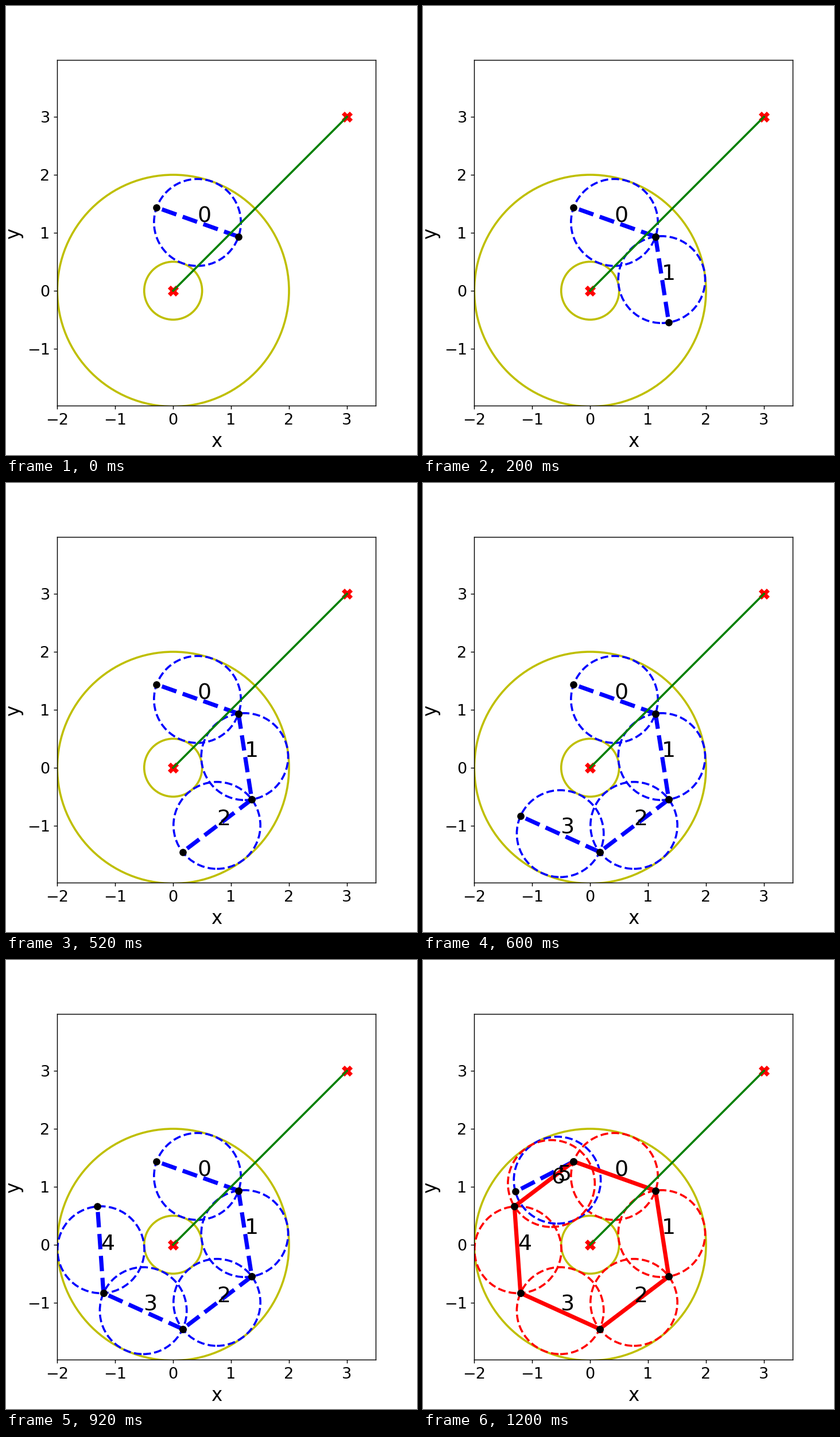
A matplotlib script for the animation above (1400 ms loop, 716 px wide and 782 px high).

```python
import numpy as np
import matplotlib.pyplot as plt
from matplotlib.animation import FuncAnimation
from matplotlib.patches import Circle

WIDTH, HEIGHT, DPI = 716, 782, 130
FRAMES, INTERVAL = 7, 200
RING, REACH, JOINT_RADIUS = 1.25, 0.75, 1.464
START, STEP = 101.2, 61.6
BRANCH_ANGLE, BRANCH_TIP = 117, (-1.287, 0.915)
LEFT, BOTTOM, RIGHT, TOP = 0.1248, 0.11, 0.9, 0.88

plt.rcParams.update({"font.family": "DejaVu Sans", "font.size": 15})
fig = plt.figure(figsize=(WIDTH / DPI, HEIGHT / DPI), dpi=DPI, facecolor="white")
ax = fig.add_axes([LEFT, BOTTOM, RIGHT - LEFT, TOP - BOTTOM])


def polar(radius, degrees):
    angle = np.radians(degrees)
    return radius * np.cos(angle), radius * np.sin(angle)


def joint(n):
    return polar(JOINT_RADIUS, START - n * STEP)


def ring_center(n):
    return polar(RING, START - (n + 0.5) * STEP)


def make_links():
    """Return (start, end, circle center) in the order the links appear."""
    links = [(joint(n), joint(n + 1), ring_center(n)) for n in range(5)]
    first_start, first_end, center = links[0]
    links[0] = (first_end, first_start, center)
    links.append((joint(0), BRANCH_TIP, polar(RING, BRANCH_ANGLE)))
    links.append((joint(5), joint(0), ring_center(5)))
    return links


LINKS = make_links()


def draw_ring(center, radius, color, style):
    ax.add_patch(Circle(center, radius, fill=False, ec=color, lw=2, ls=style))


def draw_scene():
    for radius in (RING - REACH, RING + REACH):
        draw_ring((0, 0), radius, "y", "-")
    ax.plot([0, 3], [0, 3], "rx", ms=8, mew=4)
    ax.plot([0, 3], [0, 3], "g-", lw=2, zorder=2.5)

    box_ratio = (TOP - BOTTOM) * HEIGHT / ((RIGHT - LEFT) * WIDTH)
    half_height = 5.5 * box_ratio / 2
    ax.set_xlim(-2, 3.5)
    ax.set_ylim(1 - half_height, 1 + half_height)
    ax.set_xticks(range(-2, 4))
    ax.set_yticks(range(-1, 4))
    ax.set_xlabel("x", fontsize=18)
    ax.set_ylabel("y", fontsize=18)


def draw_link(index, on_loop):
    start, end, center = LINKS[index]
    color = "r" if on_loop else "b"
    draw_ring(center, REACH, color, "--")
    ax.plot(*zip(start, end), color=color, ls="-" if on_loop else "--", lw=4)
    ax.text(*center, str(index), fontsize=21)


def update(frame):
    ax.clear()
    draw_scene()
    closed = frame == FRAMES - 1
    for index in range(frame + 1):
        draw_link(index, closed and LINKS[index][1] != BRANCH_TIP)
    for start, end, _ in LINKS[:frame + 1]:
        ax.plot(*zip(start, end), "ko", zorder=2.2)
    return ax.get_children()


anim = FuncAnimation(fig, update, frames=FRAMES, init_func=lambda: update(0),
                     interval=INTERVAL, repeat=True, repeat_delay=0, blit=False)
plt.show()
```
